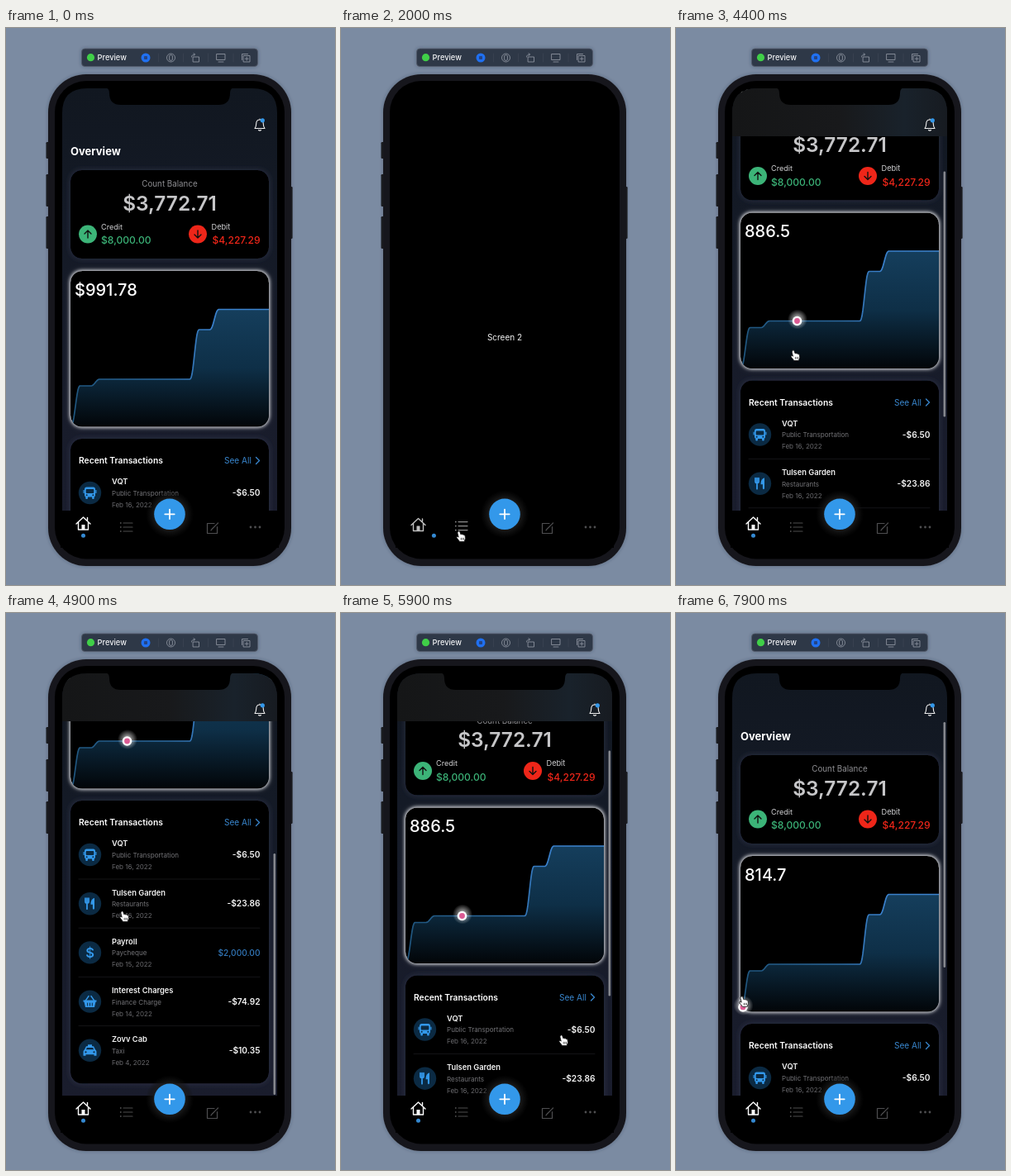
Write an HTML page that moves like this. It is 398x674 px and loops after 8 s.

```html
<!DOCTYPE html>
<html lang="en">
<head>
<meta charset="utf-8">
<style>
  html, body { margin: 0; width: 100%; height: 100%; overflow: hidden; background: #7b8ba2; }
  svg { display: block; width: 100vw; height: 100vh; font-family: Inter, sans-serif; }
</style>
</head>
<body>
<svg id="stage" viewBox="0 0 398 674"></svg>
<script>
const LOOP = 8000;
const BLUE = '#3398ea', DARK = '#0b2a43';
const CHART = { left: 78, right: 318, step: 12, bottom: 482.5 };

// Chart samples: height on screen, balance, repeat
const samples = [[482, 814.7, 1], [433, 876.53, 2], [425, 886.5, 10], [365, 961.28, 2], [340.5, 991.78, 6]]
  .flatMap(([y, value, n]) => Array(n).fill({ y, value }));

const clamp = (v, lo = 0, hi = 1) => Math.min(hi, Math.max(lo, v));
const smooth = u => u * u * (3 - 2 * u);
const easeOut = u => 1 - (1 - u) ** 2;
const ramp = (t, start, length) => easeOut(clamp((t - start) / length));

// Eased interpolation over keys of the form [time, ...values]
function track(keys, t) {
  const next = keys.findIndex(k => k[0] > t);
  if (next === 0) return keys[0].slice(1);
  if (next < 0) return keys.at(-1).slice(1);
  const a = keys[next - 1], b = keys[next];
  const u = smooth((t - a[0]) / (b[0] - a[0]));
  return a.slice(1).map((v, i) => v + (b[i + 1] - v) * u);
}

function chartY(x) {
  const pos = clamp((x - CHART.left) / CHART.step, 0, samples.length - 1);
  const i = Math.min(Math.floor(pos), samples.length - 2), u = pos - i;
  const s = u * u * u * (u * (6 * u - 15) + 10);
  return samples[i].y + (samples[i + 1].y - samples[i].y) * s;
}

const text = (x, middle, size, str, fill = '#fff', weight = 400, anchor = 'start', extra = '') =>
  `<text x="${x}" y="${middle + size * 0.364}" font-size="${size}" font-weight="${weight}" fill="${fill}" text-anchor="${anchor}" ${extra}>${str}</text>`;
const rect = (x, y, w, h, r, fill, extra = '') =>
  `<rect x="${x}" y="${y}" width="${w}" height="${h}" rx="${r}" fill="${fill}" ${extra}/>`;
const circle = (x, y, r, fill, extra = '') => `<circle cx="${x}" cy="${y}" r="${r}" fill="${fill}" ${extra}/>`;
const line = (d, color, width = 1, extra = '') =>
  `<path d="${d}" fill="none" stroke="${color}" stroke-width="${width}" stroke-linecap="round" stroke-linejoin="round" ${extra}/>`;
const at = (x, y, body, extra = '') => `<g transform="translate(${x} ${y})" ${extra}>${body}</g>`;
const card = (y, h, glow) => rect(78, y, 240, h, 14, '#000', `filter="url(#${glow})"`);

const icons = {
  bus: rect(-6.5, -7, 13, 12, 2.5, BLUE) + rect(-4.8, -4.5, 9.6, 5, 1, DARK) +
    circle(-3.8, 2.8, 1, DARK) + circle(3.8, 2.8, 1, DARK) +
    rect(-5.2, 4, 2.6, 3.4, 1, BLUE) + rect(2.6, 4, 2.6, 3.4, 1, BLUE) +
    rect(-8, -3.5, 1.2, 4, .6, BLUE) + rect(6.8, -3.5, 1.2, 4, .6, BLUE),
  meal: line('M-5.5-6.5v4q0 2 2 2t2-2v-4M-3.5-6.5v13', BLUE, 1.8) +
    `<path d="M5.5-7q-4.5 1-4.5 8h2.4v5q1 2 2.1 0z" fill="${BLUE}"/>`,
  dollar: text(0, 0, 16.5, '$', BLUE, 600, 'middle'),
  basket: `<path d="M-8-1.5H8v2H7L5.5 6.8h-11L-7 .5h-1z" fill="${BLUE}"/>` +
    line('M-5-1.5-1.5-6.5M5-1.5 1.5-6.5', BLUE, 1.6) + line('M-2.8 2v3M0 2v3M2.8 2v3', DARK),
  taxi: `<path d="M-2.5-7h5v2h2L6.5-1Q8 0 8 1.5v5H5V5H-5v1.5h-3v-5Q-8 0-6.5-1l2-4h2z" fill="${BLUE}"/>` +
    `<path d="M-3.6-3.4h7.2l1 2.4h-9.2z" fill="${DARK}"/>` + circle(-5, 2, 1.1, DARK) + circle(5, 2, 1.1, DARK),
};

const transactions = [
  ['bus', 'VQT', 'Public Transportation', 'Feb 16, 2022', '-$6.50'],
  ['meal', 'Tulsen Garden', 'Restaurants', 'Feb 16, 2022', '-$23.86'],
  ['dollar', 'Payroll', 'Paycheque', 'Feb 15, 2022', '$2,000.00'],
  ['basket', 'Interest Charges', 'Finance Charge', 'Feb 14, 2022', '-$74.92'],
  ['taxi', 'Zovv Cab', 'Taxi', 'Feb 4, 2022', '-$10.35'],
];

function transactionRow([icon, title, kind, date, amount], i) {
  const income = amount[0] === '$';
  return at(0, 562.5 + i * 59.2,
    circle(101.5, 0, 13.7, DARK) + at(101.5, 0, icons[icon]) +
    text(128, -13.5, 9.3, title, '#f4f4f4', 600) +
    text(128, .5, 8.05, kind, '#737377') + text(128, 14.5, 8.05, date, '#68686c') +
    text(307.5, 0, 10.2, amount, income ? '#3278bb' : '#f4f4f4', income ? 500 : 600, 'end') +
    (i < 4 ? line('M88 29.5H307', '#141417') : ''));
}

function balanceCard() {
  const arrow = (x, fill, dir) => circle(x, 249.5, 11, fill) +
    at(x, 249.5, line('M0 4.5v-9M-4-.5l4-4 4 4', '#101010', 1.4, `transform="scale(1 ${dir})"`));
  return card(172, 107, 'halo') +
    text(198, 188.5, 9.8, 'Count Balance', '#8d8d91', 400, 'middle') +
    text(198, 212, 24.4, '$3,772.71', '#c6c6c8', 600, 'middle') +
    arrow(99, '#3cb478', 1) + text(115, 240.5, 9.1, 'Credit', '#cfcfd1') + text(115, 257, 12.1, '$8,000.00', '#3cb478', 500) +
    arrow(232, '#ee2619', -1) + text(248.5, 240.5, 9.2, 'Debit', '#cfcfd1') + text(307.5, 257, 12.1, '$4,227.29', '#ee2619', 500, 'end');
}

function chartCard() {
  let curve = '';
  for (let x = CHART.left; x <= CHART.right; x++) curve += `${curve ? 'L' : 'M'}${x} ${chartY(x).toFixed(1)}`;
  return card(294, 188.5, 'glow') +
    `<g clip-path="url(#chartClip)"><path d="${curve}V${CHART.bottom}H${CHART.left}z" fill="url(#area)"/>` +
    line(curve, 'url(#stroke)', 1.7) + '</g>' +
    text(83, 316.5, 20, '', '#fff', 500, 'start', 'id="amount"') +
    `<g id="marker">${circle(.5, -2, 12, 'url(#spot)')}${circle(0, 0, 5.8, '#fff')}${circle(0, 0, 3.4, '#dc5b94')}</g>`;
}

function toolbar() {
  const gray = '#8b919d', thin = `stroke="${gray}" stroke-width=".9"`;
  const dividers = [184.5, 214.5, 244.5, 275].map(x => `M${x} 31v10`).join('');
  return rect(91.5, 25, 213, 21.5, 4, '#2f3747', 'stroke="#545d6e" stroke-width=".7" filter="url(#drop)"') +
    circle(102.5, 35.7, 4.6, '#40cf48') + text(110.5, 36, 9.3, 'Preview', '#f2f3f5', 500) +
    line(dividers, '#3d4555', .7) +
    circle(169, 36, 5.5, '#2070f0') + rect(167, 34, 4, 4, .8, '#254586') +
    at(199.5, 36, circle(0, 0, 5, 'none', thin) + rect(-1.9, -3.2, 3.8, 6.4, 1, 'none', thin)) +
    at(229, 36, line('M-2.5-1h7v6h-7zM-4.5-1q0-3 4-3M-2-5.5-.5-4-2-2.5', gray, .9)) +
    at(260, 36, line('M-5-4.5H5v7H-5zM-3 5h6', gray, .9)) +
    at(290, 36, line('M-4.5 2.5v-7h7M-2.5-2.5H5V5h-7.5zM1.2-.8v4M-.8 1.2h4', gray, .9));
}

function phoneBody() {
  const side = (x, y, h) => rect(x, y, 4, h, 1.2, '#17181a');
  return side(48.5, 138, 20) + side(48.5, 177, 39) + side(48.5, 228, 39) + side(342.6, 192, 63) +
    rect(51, 56, 294, 595, 46, '#19191a', 'filter="url(#drop)"') +
    rect(59, 64, 278, 578.5, 38, '#000');
}

function home() {
  return `<g id="home"><g clip-path="url(#screenClip)">
    ${rect(68, 73, 260, 511, 0, 'url(#backdrop)')}
    <g id="scroll">
      ${text(78, 149, 13, 'Overview', '#fff', 700)}
      ${balanceCard()}${chartCard()}
      ${card(497, 342.5, 'halo')}
      ${text(88, 523.5, 10.3, 'Recent Transactions', '#fff', 600)}
      ${text(264, 523.5, 10.1, 'See All', '#3987cf')}${line('M302.5 519.5l4 4-4 4', '#3987cf', 1.3)}
      ${transactions.map(transactionRow).join('')}
    </g>
    ${rect(68, 73, 260, 58, 0, 'url(#headerTint)', 'id="header"')}
    ${rect(323.5, 132, 2.6, 297, 1.3, '#85878d', 'id="bar"')}
    ${at(307, 117, line('M-6 4.5Q-4.3 2.5-4.3-1-4.3-6 0-6T4.3-1Q4.3 2.5 6 4.5zM-1.5 6.500Q0 7.8 1.5 6.500M0-6v-1', '#f0f0f0', 1.1) + circle(3.3, -5.2, 2.6, BLUE))}
    </g><path d="M119 72q6 0 6 7 0 14 14 14h118q14 0 14-14 0-7 6-7z"/></g>`;
}

function tabBar() {
  const gray = '#4e4e50';
  const dots = [-5.5, 0, 5.5].map(x => circle(x, 0, 1.4, gray)).join('');
  const bullets = [-5, 0, 5].map(y => circle(-6.7, y, .9, 'currentColor')).join('');
  return rect(66, 584, 264, 45, 0, '#000') +
    circle(198, 588.3, 29, 'url(#buttonShade)') +
    at(0, 0, line('M-8.5.5 0-7.5 8.5.5M-6-1.5v9H6v-9M5-4v-3', 'currentColor', 1.4) + rect(-2, 1.5, 4, 6, .4, 'currentColor'), 'id="homeTab"') +
    at(0, 0, line('M-3.5-5h11M-3.5 0h11M-3.5 5h11', 'currentColor', 1.2) + bullets, 'id="listTab"') +
    at(250, 604.5, line('M2-5h-8.5V7h12v-8M-1 2l7.5-7.5M-1.5 2.5l-.5 1', gray, 1.2)) +
    at(301.5, 604, dots) +
    circle(0, 614.3, 2.5, '#3489d2', 'id="tabDot"') +
    circle(198, 588.3, 18.8, BLUE) + line('M192.3 588.3h11.4M198 582.6v11.4', '#fff', 1.8);
}

const shadow = (id, color, blur, opacity, layers = 1) =>
  `<filter id="${id}" x="-20%" y="-20%" width="140%" height="140%">${
    `<feDropShadow dx="0" dy="0" stdDeviation="${blur}" flood-color="${color}" flood-opacity="${opacity}"/>`.repeat(layers)}</filter>`;
const stops = list => list.map(([offset, color, alpha = 1]) =>
  `<stop offset="${offset}" stop-color="${color}" stop-opacity="${alpha}"/>`).join('');
const gradient = (id, box, list) => `<linearGradient id="${id}" ${box}>${stops(list)}</linearGradient>`;
const radial = (id, list) => `<radialGradient id="${id}">${stops(list)}</radialGradient>`;
const down = 'x1="0" y1="0" x2="0" y2="1"';

const stage = document.getElementById('stage');
stage.innerHTML = `<defs>
  ${shadow('drop', '#26303f', 2.2, .4)}${shadow('halo', '#3b4058', 3.5, .65)}${shadow('glow', '#d4d6da', 2.2, .9, 2)}
  ${gradient('backdrop', down, [[0, '#111720'], [.3, '#141a26'], [1, '#1a1d2d']])}
  ${gradient('headerTint', '', [[0, '#151617'], [.5, '#18191b'], [.8, '#19222b'], [1, '#171b21']])}
  ${gradient('area', down, [[0, '#153e5c'], [.5, '#0e2f47'], [1, '#020508']])}
  ${gradient('stroke', 'gradientUnits="userSpaceOnUse" x1="78" x2="318" y1="0" y2="0"', [[0, '#1f557d'], [.5, '#2c6ba2'], [.7, '#397fca'], [1, '#3d85d0']])}
  ${radial('spot', [[0, '#fff', .9], [.45, '#fff', .45], [1, '#fff', 0]])}
  ${radial('buttonShade', [[0, '#1c1c1c'], [.65, '#1c1c1c', .9], [.85, '#141414', .45], [1, '#101010', 0]])}
  <clipPath id="screenClip"><path d="M68 584V103q0-30 30-30h200q30 0 30 30v481z"/></clipPath>
  <clipPath id="chartClip">${rect(78, 294, 240, 188.5, 14, '#000')}</clipPath>
  </defs>
  ${rect(0, 0, 398, 674, 0, '#7b8ba2')}
  ${toolbar()}${phoneBody()}${home()}
  ${text(198, 374, 10, 'Screen 2', '#f2f2f2', 400, 'middle', 'id="second"')}
  ${tabBar()}
  <g id="cursor"><g transform="scale(.92)" stroke="#111" stroke-width=".9" stroke-linejoin="round">
    <path d="M-3.5-6.5q1.5-1 2.2.8L-.2-2.500Q1-3.5 1.8-2.2 3-3 3.8-1.5 5.2-2 5.6-.2L6 3 4.5 7h-6l-4-5Q-6 0-4 .5l1 .8-1.5-5.8z" fill="#fff"/>
    <path d="M.2 2v3M2 2v3M3.8 2v3" stroke-width=".7"/></g></g>`;

const cursorKeys = [
  [100, 57, 660], [700, 120, 636], [1200, 145, 615], [2350, 145, 615], [3100, 94, 607], [3400, 94, 607],
  [3700, 160, 527], [4150, 147, 460], [4550, 143, 367], [5100, 143, 367], [5500, 266, 425],
  [5900, 269, 517], [6100, 267, 525], [6400, 213, 455], [6900, 148, 440], [7350, 292, 420], [7800, 82, 470],
];
const scrollKeys = [[4150, 0], [4900, 270], [5480, 270], [6105, -12], [6550, 0]];
const TOUCH = 4150, DRAG = 6900;

const $ = id => document.getElementById(id);
const move = (id, x, y) => $(id).setAttribute('transform', `translate(${x} ${y})`);
const show = (id, on) => $(id).style.display = on ? '' : 'none';
const shade = p => { const v = Math.round(78 + 177 * p); return `rgb(${v},${v},${v})`; };

function render(t) {
  const [cx, cy] = track(cursorKeys, t);
  const [offset] = track(scrollKeys, t);

  show('cursor', t >= 100);
  move('cursor', cx, cy);

  const away = t >= 1910 && t < 3310;
  show('home', !away);
  show('second', away);
  const tab = ramp(t, 1910, 450) - ramp(t, 3310, 450);
  move('homeTab', 93.5, 599.5 + 4 * tab);
  move('listTab', 145.5, 604 - 4 * tab);
  $('homeTab').style.color = shade(1 - tab);
  $('listTab').style.color = shade(tab);
  $('tabDot').setAttribute('cx', 93.5 + 52 * tab);

  const touched = t >= TOUCH;
  move('scroll', 0, -offset);
  $('header').style.opacity = clamp(offset / 25);
  show('bar', touched);
  const top = 132 + Math.max(0, offset) * .589;
  $('bar').setAttribute('y', top);
  $('bar').setAttribute('height', Math.min(297 + Math.min(0, offset), 583 - top));

  const x = t < DRAG ? 146.5 : clamp(cx - 1, CHART.left, CHART.right);
  show('marker', touched);
  move('marker', x, chartY(x));
  $('amount').textContent = touched ? samples[Math.floor((x - CHART.left) / CHART.step)].value : '$991.78';
}

function tick() {
  render(performance.now() % LOOP);
  requestAnimationFrame(tick);
}
tick();
</script>
</body>
</html>
```
